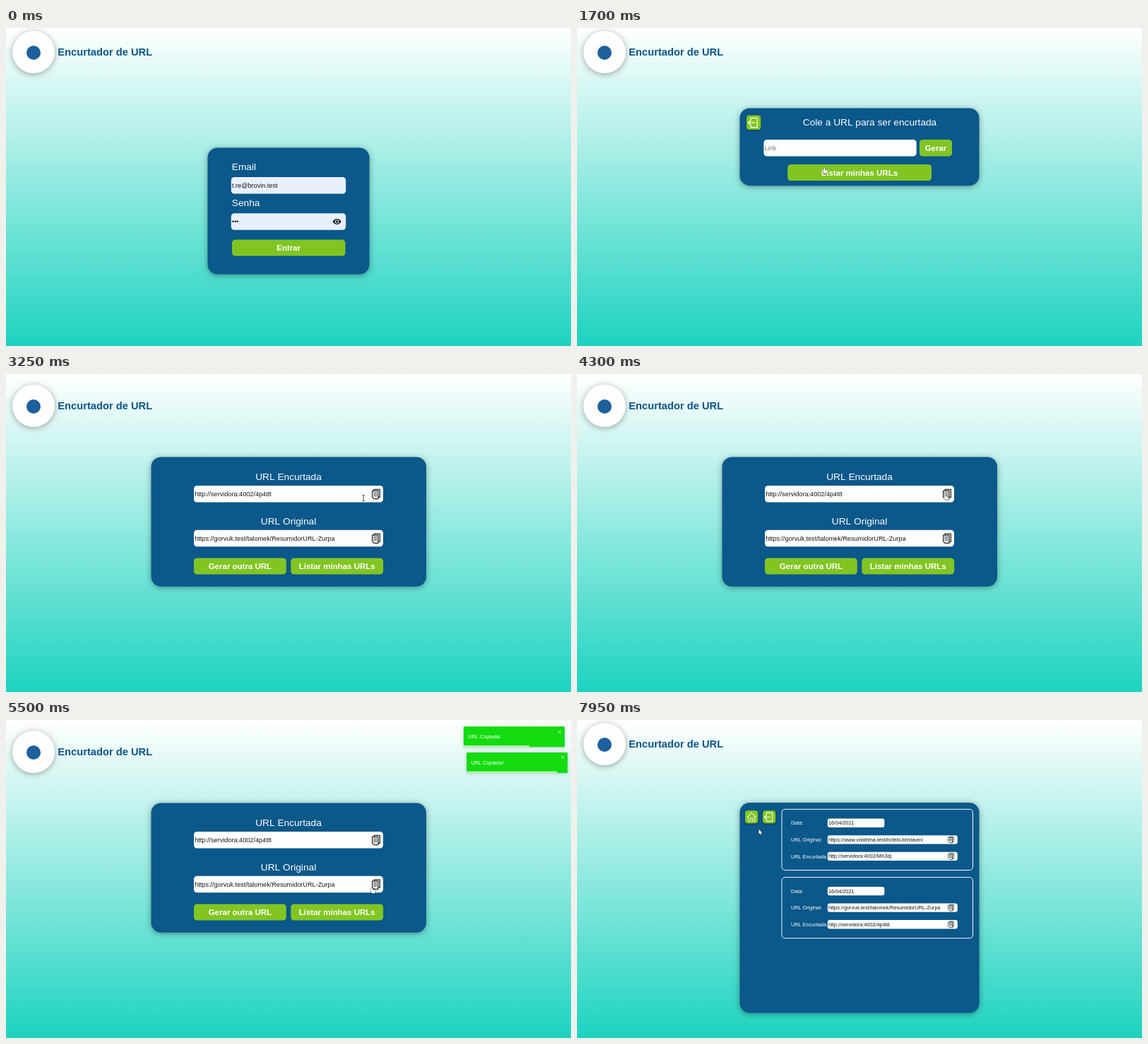
An HTML page with a canvas for the animation above (8 s loop, 800x450 px).

```html
<!DOCTYPE html>
<html lang="pt-BR">
<head>
<meta charset="utf-8">
<title>Encurtador de URL</title>
<style>
html, body { margin: 0; width: 100%; height: 100%; overflow: hidden; }
canvas { display: block; width: 100vw; height: 100vh; }
</style>
</head>
<body>
<canvas></canvas>
<script>
const LOOP = 8000;
const FONT = '"Liberation Sans", Arial, sans-serif';
const BLUE = '#0b588a', GREEN = '#82c522', WHITE = '#fefefe', INK = '#161616';
const LONG_URL = 'https://gorvuk.test/talomek/ResumidorURL-Zurpa';
const SHORT_URL = 'http://servidora:4002/4p4t8';

const canvas = document.querySelector('canvas');
const ctx = canvas.getContext('2d');
const ratio = Math.max(1, window.devicePixelRatio || 1);
canvas.width = 800 * ratio;
canvas.height = 450 * ratio;

// Cursor stops: time, x, y
const STOPS = [
  [150, 425, 361], [800, 395, 308], [1150, 395, 308], [1680, 350.5, 198],
  [1950, 330, 168], [2200, 330, 168], [2630, 499.5, 178], [2880, 499.5, 178],
  [3900, 521.5, 170], [4400, 521.5, 170], [5050, 525, 233], [5300, 525, 233],
  [6350, 453, 275], [6850, 453, 275], [7750, 257.5, 154.5]
];
const PRESSES = [[1000, 1100], [2720, 2850], [6660, 6800]];
const TOAST_STARTS = [4340, 5152];
const ENTER = 464, LIFE = 3310;

let zones, pointer, pressed;

const mix = (a, b, p) => a + (b - a) * p;
const easeOut = p => 1 - (1 - p) ** 3;
const smooth = p => p * p * (3 - 2 * p);
const inside = (p, x, y, w, h) => p && p.x >= x && p.x <= x + w && p.y >= y && p.y <= y + h;

function cursorAt(t) {
  if (t < STOPS[0][0]) return null;
  const next = STOPS.findIndex(s => s[0] > t);
  if (next < 0) { const [, x, y] = STOPS[STOPS.length - 1]; return { x, y }; }
  const [t0, x0, y0] = STOPS[next - 1], [t1, x1, y1] = STOPS[next];
  const p = smooth((t - t0) / (t1 - t0));
  return { x: mix(x0, x1, p), y: mix(y0, y1, p) };
}

function shadow(color, blur, dy = 0) {
  ctx.shadowColor = color;
  ctx.shadowBlur = blur * ratio;
  ctx.shadowOffsetY = dy * ratio;
}

function scoped(draw) { ctx.save(); draw(); ctx.restore(); }

function box(x, y, w, h, r, fill) {
  ctx.beginPath();
  ctx.roundRect(x, y, w, h, r);
  ctx.fillStyle = fill;
  ctx.fill();
}

function text(str, x, y, size, color = WHITE, align = 'left', weight = '') {
  ctx.font = `${weight} ${size}px ${FONT}`;
  ctx.textAlign = align;
  ctx.fillStyle = color;
  ctx.fillText(str, x, y);
}

function lines(path, color, width) {
  ctx.strokeStyle = color;
  ctx.lineWidth = width;
  ctx.lineJoin = ctx.lineCap = 'round';
  ctx.stroke(new Path2D(path));
}

function card(x, y, w, h) {
  scoped(() => { shadow('rgba(0,0,0,.38)', 9, 1.5); box(x, y, w, h, 14, BLUE); });
}

function field(x, y, w, h, value, size, color = INK, fill = WHITE) {
  zones.push(['text', x, y, w, h]);
  box(x, y, w, h, h > 15 ? 4.5 : 3, fill);
  text(value, x + 1.2, y + h / 2 + size * .34, size, color);
}

function button(x, y, w, h, label) {
  zones.push(['hand', x, y, w, h]);
  scoped(() => {
    ctx.translate(x + w / 2, y + h / 2);
    if (pressed && inside(pointer, x, y, w, h)) ctx.scale(.9, .9);
    box(-w / 2, -h / 2, w, h, 4.5, GREEN);
    text(label, 0, 4.1, 11.5, WHITE, 'center', 'bold');
  });
}

const ICONS = {
  exit: 'M6 7V3.7H15V16.8H6V13.5M11.5 10.2H2.5M5.2 7.5L2.5 10.2L5.2 13',
  home: 'M3 10.3L10 3.5L17 10.3M5 9V16.5H8.4V11.5H11.6V16.5H15V9'
};

function iconButton(x, y, size, name) {
  zones.push(['hand', x, y, size, size]);
  scoped(() => {
    shadow('rgba(0,0,0,.4)', 3, 1);
    box(x, y, size, size, 4, GREEN);
  });
  scoped(() => {
    ctx.translate(x, y);
    ctx.scale(size / 20, size / 20);
    lines(ICONS[name], name === 'home' ? '#e6f2d2' : WHITE, 1.2);
  });
}

function copyIcon(cx, cy, scale) {
  zones.push(['hand', cx - 6 * scale, cy - 7 * scale, 12 * scale, 14 * scale]);
  scoped(() => {
    ctx.translate(cx, cy);
    ctx.scale(scale, scale);
    lines('M-3 -5V-6.6H5.4V4.4H3.4', '#222', 1.2);
    lines('M-5.4 -4.6H3V6.6H-2.8L-5.4 4.2Z', '#222', 1.2);
    lines('M-3.4 -2H1.2M-3.4 .2H1.2M-3.4 2.4H1.2', '#222', .9);
  });
}

function eyeIcon(x, y) {
  ctx.fillStyle = INK;
  ctx.fill(new Path2D(`M${x - 6} ${y}Q${x - 3.6} ${y - 4.1} ${x} ${y - 4.1}T${x + 6} ${y}Q${x + 3.6} ${y + 4.1} ${x} ${y + 4.1}T${x - 6} ${y}Z`));
  dot(x, y, 2.8, '#e8f0fe');
  dot(x, y, 1.7, INK);
}

function dot(x, y, r, fill) {
  ctx.beginPath();
  ctx.arc(x, y, r, 0, 7);
  ctx.fillStyle = fill;
  ctx.fill();
}

function background() {
  const sky = ctx.createLinearGradient(0, 0, 0, 450);
  sky.addColorStop(0, '#ffffff');
  sky.addColorStop(1, '#1dd3c0');
  ctx.fillStyle = sky;
  ctx.fillRect(0, 0, 800, 450);
}

function header(dy) {
  scoped(() => { shadow('rgba(0,0,0,.35)', 9, 1.5); dot(39, 34 + dy, 30, WHITE); });
  dot(39, 35 + dy, 10, '#1c609c');
  text('Encurtador de URL', 73.3, 38.8 + dy, 14.7, '#0b558a', 'left', 'bold');
}

function login() {
  header(0);
  card(285.5, 169.5, 229, 179);
  text('Email', 319.8, 200.7, 13.7);
  field(318.8, 211, 162.4, 23.6, 't.re@brovin.test', 9.15, INK, '#e8f0fe');
  text('Senha', 319.8, 251.8, 13.7);
  field(318.8, 262.2, 162.4, 23.6, '', 9.15, INK, '#e8f0fe');
  for (let i = 0; i < 3; i++) dot(321.5 + i * 3.1, 273.8, 1.2, INK);
  eyeIcon(468.6, 274);
  button(320, 299.6, 160.5, 23, 'Entrar');
}

function home(t) {
  header(0);
  card(230.5, 113.4, 339, 109.8);
  iconButton(240, 123.6, 20.3, 'exit');
  text('Cole a URL para ser encurtada', 414.5, 138, 13.7, WHITE, 'center');
  const pasted = t >= 2150;
  field(264.4, 158, 216.2, 23.6, pasted ? LONG_URL : 'Link', 9.15, pasted ? INK : '#757575');
  button(485, 158, 46, 23.6, 'Gerar');
  button(298.2, 193, 203.8, 23, 'Listar minhas URLs');
}

function result() {
  header(11);
  card(205.5, 117.5, 389.5, 183.3);
  [['URL Encurtada', SHORT_URL, 0], ['URL Original', LONG_URL, 62.7]].forEach(([title, url, dy]) => {
    text(title, 400, 150.2 + dy, 13.7, WHITE, 'center');
    field(266, 158 + dy, 268, 23.6, url, 9.15);
    copyIcon(524, 170 + dy, 1);
  });
  button(266, 260.5, 130.8, 23, 'Gerar outra URL');
  button(403.3, 260.5, 130.8, 23, 'Listar minhas URLs');
}

function entry(dy, longUrl, shortUrl) {
  ctx.beginPath();
  ctx.roundRect(290, 126.3 + dy, 270.5, 86.2, 4.5);
  ctx.strokeStyle = '#f4f8fb';
  ctx.lineWidth = 1;
  ctx.stroke();
  [['Data:', '16/04/2021', 80.5], ['URL Original:', longUrl, 184], ['URL Encurtada:', shortUrl, 184]]
    .forEach(([label, value, width], row) => {
      const y = 139.6 + dy + row * 23.6;
      text(label, 303, y + 8.7, 7.3);
      field(354.8, y, width, 12.3, value, 7.3);
      if (row) copyIcon(529.6, y + 6.2, .66);
    });
}

function list() {
  header(0);
  card(230.5, 117, 339, 297.5);
  iconButton(238, 128, 18.2, 'home');
  iconButton(263, 128, 18.2, 'exit');
  entry(0, 'https://www.voldrima.test/in/telo-bristavin/', 'http://servidora:4002/MK3dj');
  entry(96.3, LONG_URL, SHORT_URL);
}

// Bouncing entry from the right: progress, offset
const BOUNCE = [[0, 1340], [.6, -11], [.75, 4.5], [.9, -2.2], [1, 0]];

function bounce(p) {
  const next = BOUNCE.findIndex(k => k[0] > p);
  if (next < 0) return 0;
  const [p0, a] = BOUNCE[next - 1], [p1, b] = BOUNCE[next];
  return mix(a, b, easeOut((p - p0) / (p1 - p0)));
}

function toast(age, y) {
  if (age < 0) return;
  scoped(() => {
    ctx.translate(648 + bounce(age / ENTER), y);
    ctx.globalAlpha = Math.min(1, easeOut(Math.min(1, age / ENTER / .6)));
    scoped(() => { shadow('rgba(0,0,0,.2)', 5, .5); box(0, 0, 143, 29, .6, '#14dc10'); });
    text('URL Copiada!', 6.2, 17, 7.3);
    lines('M134 5.4L137.6 9M137.6 5.4L134 9', '#d4f8d2', .8);
    ctx.fillStyle = 'rgba(255,255,255,.7)';
    ctx.fillRect(0, 26.8, 143 * (1 - age / LIFE), 2.2);
  });
}

const CURSORS = {
  arrow: 'M0 0V7L1.6 5.6L2.7 8L3.8 7.5L2.7 5.2H4.8Z',
  hand: 'M-.9 .8Q0 -.6 .9 .8V3L4 3.7Q4.9 4 4.8 5L4.2 8.3H0L-2.3 5.3Q-2.4 4.1 -.9 4.9Z',
  text: 'M-1.2 -4H1.2M0 -4V4M-1.2 4H1.2'
};

function drawCursor() {
  if (!pointer) return;
  const zone = zones.filter(([, ...rect]) => inside(pointer, ...rect)).pop();
  const kind = zone ? zone[0] : 'arrow';
  scoped(() => {
    ctx.translate(pointer.x, pointer.y);
    lines(CURSORS[kind], '#222', kind === 'text' ? .8 : .9);
    if (kind === 'text') return;
    ctx.fillStyle = '#fff';
    ctx.fill(new Path2D(CURSORS[kind]));
  });
}

function render(t) {
  ctx.setTransform(ratio, 0, 0, ratio, 0, 0);
  zones = [];
  pointer = cursorAt(t);
  pressed = PRESSES.some(([from, to]) => t >= from && t < to);
  background();
  if (t < 1100) login();
  else if (t < 2850) home(t);
  else if (t < 6800) {
    result();
    TOAST_STARTS.forEach((start, i) => toast(t - start, 9.3 + i * 36.6));
  } else list();
  drawCursor();
}

const begin = performance.now();
function tick() {
  render((performance.now() - begin) % LOOP);
  requestAnimationFrame(tick);
}
tick();
</script>
</body>
</html>
```
